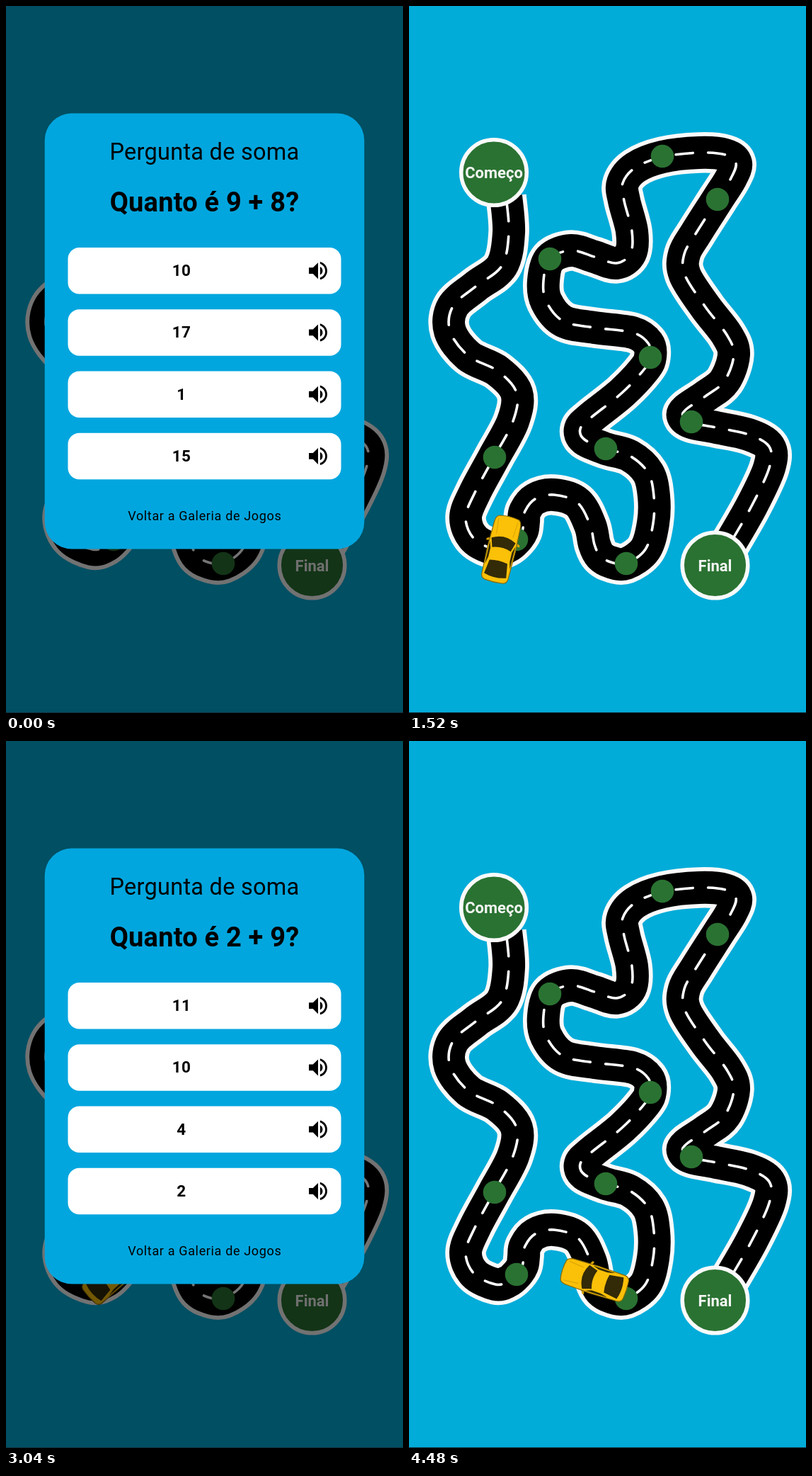
An HTML page that plays this animation: 561 by 998 pixels, repeating every 4560 ms.

```html
<!DOCTYPE html>
<html lang="pt">
<head>
<meta charset="utf-8">
<title>Pergunta de soma</title>
<style>
  html, body { margin: 0; width: 100%; height: 100%; overflow: hidden; background: #01acd9; }
  svg { display: block; width: 100vw; height: 100vh; }
  text { font-family: Roboto, sans-serif; text-anchor: middle; }
  .b { font-weight: 700; }
  .sign { font-size: 22px; fill: #f4f6f4; }
  .opt { font-size: 22.5px; letter-spacing: .4px; }
  .road path { fill: none; stroke-linejoin: round; }
</style>
</head>
<body>
<svg viewBox="0 0 561 998">
  <rect width="561" height="998" fill="#01acd9"/>
  <g class="road">
    <path stroke="#fafafa" stroke-width="57.5"/>
    <path stroke="#000" stroke-width="46"/>
    <path stroke="#fff" stroke-width="3.6" stroke-linecap="round" stroke-dasharray="24 21.5" stroke-dashoffset="-12"/>
  </g>
  <g id="dots" fill="#2a7232"></g>
  <g fill="#2a7232" stroke="#fafafa" stroke-width="5.5">
    <circle cx="120" cy="235" r="46.3"/>
    <circle cx="432.5" cy="789.5" r="46.3"/>
  </g>
  <text class="b sign" x="120" y="243">Começo</text>
  <text class="b sign" x="432.5" y="797.5">Final</text>
  <g id="car">
    <path d="M-20-13l-4 2v3l4-1zM20-13l4 2v3l-4-1z" fill="#d9a300"/>
    <path d="M-14-46Q0-49 14-46Q19-44 19-34L20 0L19 40Q18 46 12 46.500Q0 48 -12 46.500Q-18 46 -19 40L-20 0L-19-34Q-19-44 -14-46Z" fill="#fbc008" stroke="#8a6a05" stroke-width="1.2"/>
    <path d="M-14-42L-12-20M14-42L12-20" stroke="#d9a306" fill="none"/>
    <path d="M-17.500-13Q0-23 17.500-13L13.500 0Q0-5 -13.500 0ZM-13 18Q0 15 13 18L16 38Q0 43 -16 38ZM-18.500-8L-15.500 1V14L-18 25ZM18.500-8L15.500 1V14L18 25Z" fill="#332a08"/>
  </g>
  <rect id="shade" width="561" height="998"/>
  <g id="card">
    <rect x="54.700" y="151.500" width="451.600" height="615" rx="38" fill="#02a6de"/>
    <text x="280.500" y="217" font-size="32.500" letter-spacing=".25">Pergunta de soma</text>
    <text id="ask" class="b" x="280.500" y="289.500" font-size="38" letter-spacing=".2"></text>
    <g id="opts"></g>
    <text x="280.800" y="725.500" font-size="18" letter-spacing=".65">Voltar a Galeria de Jogos</text>
  </g>
  <rect y="997" width="561" height="1" fill="#12303a"/>
</svg>
<script>
const LOOP = 4560, STEP = 80;
const $ = s => document.querySelector(s);
const clamp = x => Math.min(1, Math.max(0, x));
const ramp = (t, from, to) => clamp((t - from) / (to - from));
const easeOut = x => 1 - Math.pow(1 - x, 1.8);

const pairs = s => s.trim().split(/\s+/).map(p => p.split(',').map(Number));
const lead = pairs(`137,268 141,320 131,367 94,396 62,424 58,459 84,494 125,515 152,546 147,586`);
const legA = pairs(`120,637 93,687 80,722 92,752 122,767 140,763`);
const legB = pairs(`152,753 160,741 162,728 164,713 178,696 205,690 238,701 256,733 262,760 270,776 285,785`);
const rest = pairs(`307,787 334,767 345,730 346,692 338,659 312,635 278,625 248,612 242,597 256,582
  301,546 333,512 341,495 338,476 316,461 262,454 218,445 194,417 190,388 199,357 229,345 262,354
  293,363 313,349 315,318 304,275 302,250 320,228 358,213 410,207 447,210 462,222 455,243 436,273
  406,320 389,350 390,380 419,425 449,464 459,492 446,529 420,550 392,569 387,579 399,588 434,595
  480,605 509,622 509,652 484,706 450,765`);
const pts = [...lead, ...legA, ...legB, ...rest];

// Catmull-Rom spline through the first n + 1 points
function spline(n) {
  const at = i => pts[Math.min(pts.length - 1, Math.max(0, i))];
  let d = 'M' + pts[0];
  for (let i = 0; i < n; i++) {
    const [a, b, c, e] = [at(i - 1), at(i), at(i + 1), at(i + 2)];
    const c1 = b.map((v, k) => v + (c[k] - a[k]) / 6);
    const c2 = c.map((v, k) => v - (e[k] - b[k]) / 6);
    d += `C${c1} ${c2} ${c}`;
  }
  return d;
}

const layers = document.querySelectorAll('.road path');
const road = layers[0];
const lengthTo = n => { road.setAttribute('d', spline(n)); return road.getTotalLength(); };
const stopA = lengthTo(lead.length);
const stopB = lengthTo(lead.length + legA.length);
const stopC = lengthTo(lead.length + legA.length + legB.length);
layers.forEach(p => p.setAttribute('d', spline(pts.length - 1)));

$('#dots').innerHTML = pairs('121,637 152,753 307,787 278,625 341,496 199,357 358,212 436,273 399,587')
  .map(([x, y]) => `<circle cx="${x}" cy="${y}" r="16.3"/>`).join('');

const speaker = 'M3 9v6h4l5 5V4L7 9H3zm13.5 3c0-1.77-1.02-3.29-2.5-4.03v8.05c1.48-.73 2.5-2.25 2.5-4.02z' +
  'M14 3.23v2.06c2.89.86 5 3.54 5 6.71s-2.11 5.85-5 6.71v2.06c4.01-.91 7-4.49 7-8.77s-2.99-7.86-7-8.77z';
$('#opts').innerHTML = [0, 1, 2, 3].map(i => `<g transform="translate(0 ${341 + i * 87.25})">
  <rect x="87.5" width="386" height="65.5" rx="16"/>
  <text class="b opt" x="248" y="40"></text>
  <path transform="translate(423.7 15.4) scale(1.44)" d="${speaker}"/></g>`).join('');
const boxes = document.querySelectorAll('#opts rect');
const labels = document.querySelectorAll('#opts text');

const rounds = [
  { ask: 'Quanto é 9 + 8?', answers: [10, 17, 1, 15], right: 1, pick: 505 },
  { ask: 'Quanto é 2 + 9?', answers: [11, 10, 4, 2], right: 0, pick: 3480 }
];

function placeCar(t) {
  const s = stopA + (stopB - stopA) * ramp(t, 918, 1612) + (stopC - stopB) * ramp(t, 4013, 4619);
  const p = road.getPointAtLength(s);
  const a = road.getPointAtLength(s - 1), b = road.getPointAtLength(s + 1);
  const heading = Math.atan2(b.y - a.y, b.x - a.x) * 180 / Math.PI;
  // the car turns against the heading
  $('#car').setAttribute('transform', `translate(${p.x} ${p.y}) rotate(${-heading})`);
}

function draw(t) {
  placeCar(t);
  const r = rounds[t < 1400 ? 0 : 1];
  const show = easeOut(t < 1400 ? 1 - ramp(t, 983, 1133)
    : t < 3000 ? ramp(t, 1535, 1680) : 1 - ramp(t, 3977, 4127));
  $('#shade').setAttribute('opacity', .54 * show);
  $('#card').setAttribute('opacity', show);
  $('#ask').textContent = r.ask;
  const k = ramp(t, r.pick, r.pick + 250);
  const green = [69, 160, 76].map(v => Math.round(255 + (v - 255) * k));
  boxes.forEach((box, i) => {
    box.setAttribute('fill', i === r.right ? `rgb(${green})` : '#fff');
    labels[i].textContent = r.answers[i];
  });
}

const start = performance.now();
function tick() {
  const t = (performance.now() - start) % LOOP;
  draw(Math.floor(t / STEP) * STEP);
  requestAnimationFrame(tick);
}
tick();
</script>
</body>
</html>
```
